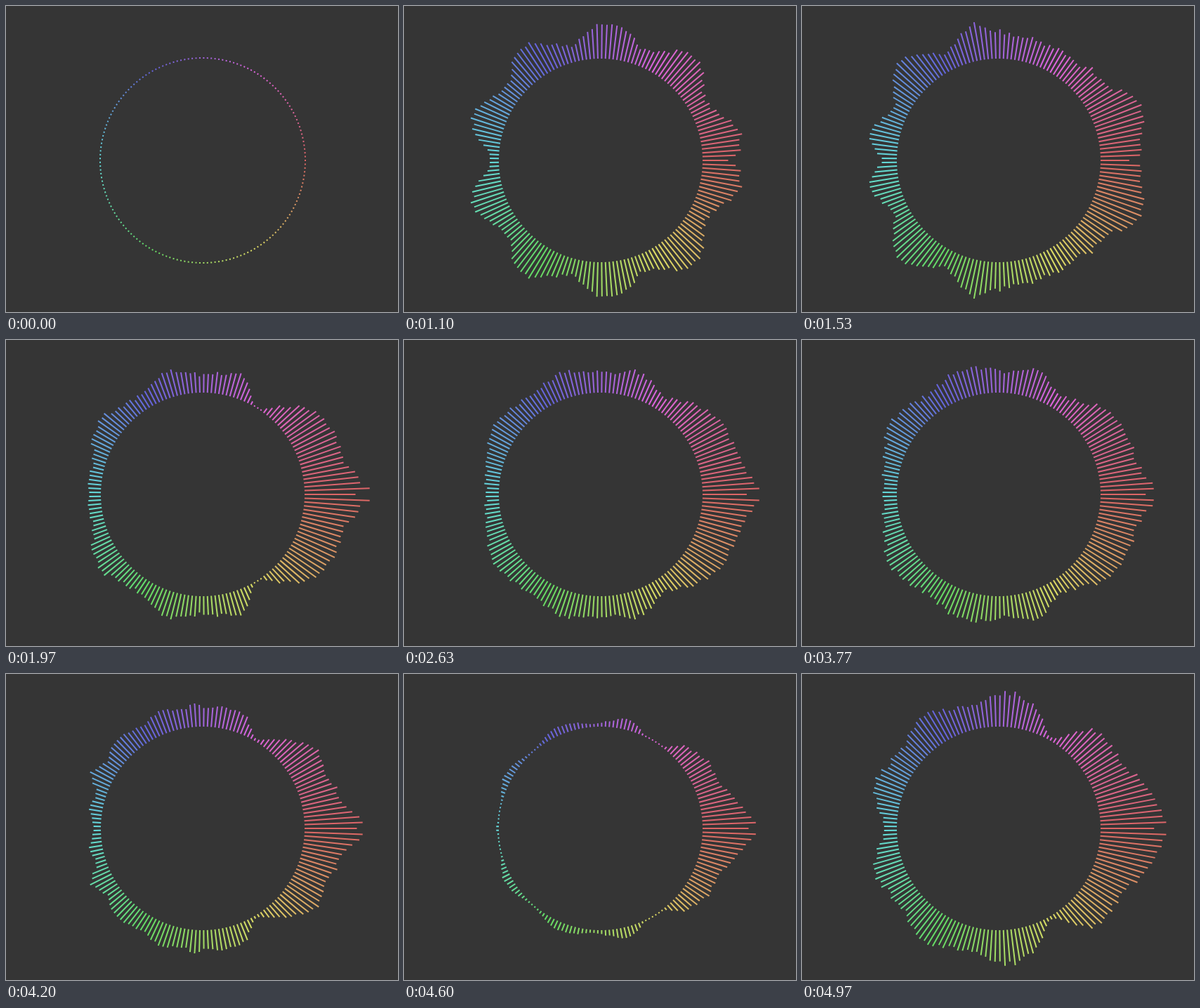
Write an HTML page with a canvas that moves like this. It is 558 by 436 pixels and loops after 5.01 s.

```html
<!DOCTYPE html>
<html lang="en">
<head>
<meta charset="utf-8">
<title>Radial spectrum</title>
<style>
  html, body { margin: 0; width: 100%; height: 100%; overflow: hidden; background: #353535; }
  canvas { display: block; }
</style>
</head>
<body>
<canvas id="stage" width="558" height="436"></canvas>
<script>
const ctx = document.getElementById('stage').getContext('2d');
const LOOP = 5010, FPS = 30, LAST = 149;
const CX = 280, CY = 220, RADIUS = 145;
const BARS = 169, HALF = 84, STEP = 360 / BARS;
const MIN_LEN = 2, MAX_LEN = 101;
const RIPPLE = 38; // degrees between crests

// The sound at a few moments: bass peak, overall level, ripple and notch depth.
const moods = [
  { at: 33,  bass: 8,  level: 38, swing: 14, crest: 10,  notch: 0 },
  { at: 59,  bass: 65, level: 28, swing: 7,  crest: 31,  notch: 36 },
  { at: 79,  bass: 52, level: 31, swing: 4,  crest: 31,  notch: 16 },
  { at: 113, bass: 45, level: 34, swing: 5,  crest: 31,  notch: 18 },
  { at: 138, bass: 72, level: 6,  swing: 5,  crest: 36,  notch: 20 },
  { at: 149, bass: 55, level: 39, swing: 6,  crest: 48,  notch: 40 }
];

const clamp = (x, a, b) => Math.min(b, Math.max(a, x));
const mix = (a, b, t) => a + (b - a) * t;
const ease = t => t * t * (3 - 2 * t);
const bell = x => Math.exp(-x * x / 2);

function hash(a, b) {
  const s = Math.sin(a * 127.1 + b * 311.7) * 43758.5453;
  return (s - Math.floor(s)) * 2 - 1;
}

// Smooth seeded noise in two directions, from -1 to 1.
function noise(x, y) {
  const i = Math.floor(x), j = Math.floor(y), u = ease(x - i), v = ease(y - j);
  return mix(mix(hash(i, j), hash(i + 1, j), u),
             mix(hash(i, j + 1), hash(i + 1, j + 1), u), v);
}

// Mood at a tick; "stir" is the extra movement between two moments.
function moodAt(tick) {
  let n = 0;
  while (n < moods.length - 2 && tick >= moods[n + 1].at) n++;
  const a = moods[n], b = moods[n + 1];
  const u = (tick - a.at) / (b.at - a.at);
  const mood = { stir: Math.sqrt(Math.max(0, Math.sin(Math.PI * u))) };
  for (const key in a) mood[key] = mix(a[key], b[key], ease(u));
  return mood;
}

function barLength(i, tick, m) {
  const deg = Math.max(1, i) * STEP;
  let len = m.level + m.bass * Math.exp(-deg / 30)
    + m.swing * Math.cos(2 * Math.PI * (deg - m.crest) / RIPPLE)
    - m.notch * bell((deg - 59) / 7)
    + m.stir * (6 + 11 * noise(i / 4, tick / 4));
  len *= 1 - 0.45 * bell((180 - deg) / 10);
  len += 4 * noise(i + 500, tick / 4) * clamp(len / 25, 0, 1);
  return clamp(i ? len : len - 14, MIN_LEN, MAX_LEN);
}

function bar(index, len) {
  const deg = index * STEP;
  ctx.save();
  ctx.translate(CX, CY);
  ctx.rotate(deg * Math.PI / 180);
  ctx.fillStyle = `hsl(${(deg + 360) % 360}, 63%, 63%)`;
  ctx.fillRect(RADIUS, -1, len, 2);
  ctx.restore();
}

function draw(ms) {
  const tick = Math.min(LAST, Math.floor((ms + 4) * FPS / 1000));
  const mood = tick < moods[0].at ? null : moodAt(tick);
  ctx.fillStyle = '#353535';
  ctx.fillRect(0, 0, 558, 436);
  for (let i = 0; i <= HALF; i++) {
    const len = mood ? barLength(i, tick, mood) : MIN_LEN;
    bar(i, len);
    if (i) bar(-i, len);
  }
}

const start = performance.now();
function loop() {
  draw((performance.now() - start) % LOOP);
  requestAnimationFrame(loop);
}
loop();
</script>
</body>
</html>
```
